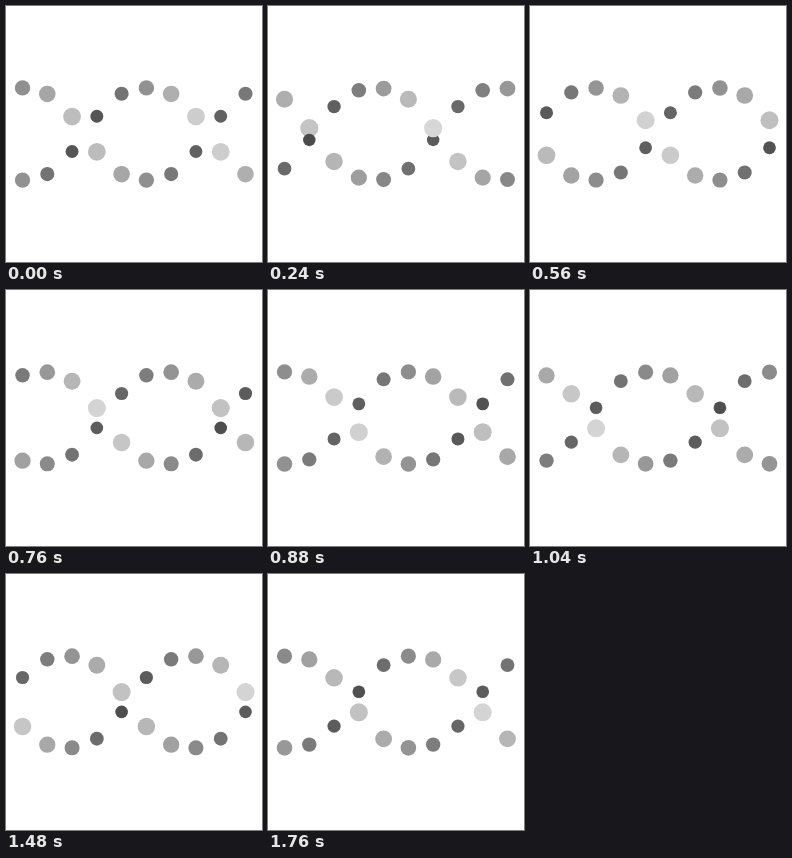
Write an HTML page that moves like this. It is 256 by 256 pixels and loops after 1800 ms.

```html
<!DOCTYPE html>
<html lang="en">
<head>
<meta charset="utf-8">
<title>Double helix loader</title>
<style>
  html, body { margin: 0; width: 100%; height: 100%; overflow: hidden; background: #fff; }
  svg { display: block; width: 100%; height: 100%; }

  circle {
    --dur: 1800ms;
    animation:
      swing var(--dur) cubic-bezier(.5, 0, .5, 1) var(--delay) infinite,
      swell var(--dur) linear calc(var(--delay) - var(--dur) / 4) infinite,
      shade var(--dur) linear calc(var(--delay) - var(--dur) / 4) infinite;
  }
  .back  { --dark: #565656; --light: #c8c8c8; }
  .front { --dark: #464646; --light: #dcdcdc; }

  @keyframes swing {
    0%, 100% { cy: 32px; }
    50% { cy: 68px; }
  }
  @keyframes swell {
    0%, 100% { r: 2.4px; }
    50% { r: 3.6px; }
  }
  @keyframes shade {
    0%, 100% { fill: var(--dark); }
    50% { fill: var(--light); }
  }
</style>
</head>
<body>
<svg viewBox="0 0 100 100"></svg>
<script>
  const svg = document.querySelector('svg');
  const COLUMNS = 10, UNIT = 100 / 15.5, STEP = 180, HALF_TURN = 900;

  function addDot(strand, column, lead) {
    const dot = document.createElementNS('http://www.w3.org/2000/svg', 'circle');
    dot.setAttribute('class', strand);
    dot.setAttribute('cx', UNIT * (1 + 1.5 * column));
    dot.style.setProperty('--delay', `${-(column * STEP + lead)}ms`);
    svg.append(dot);
  }

  for (let i = 0; i < COLUMNS; i++) {
    addDot('back', i, 0);
    addDot('front', i, HALF_TURN);
  }
</script>
</body>
</html>
```
